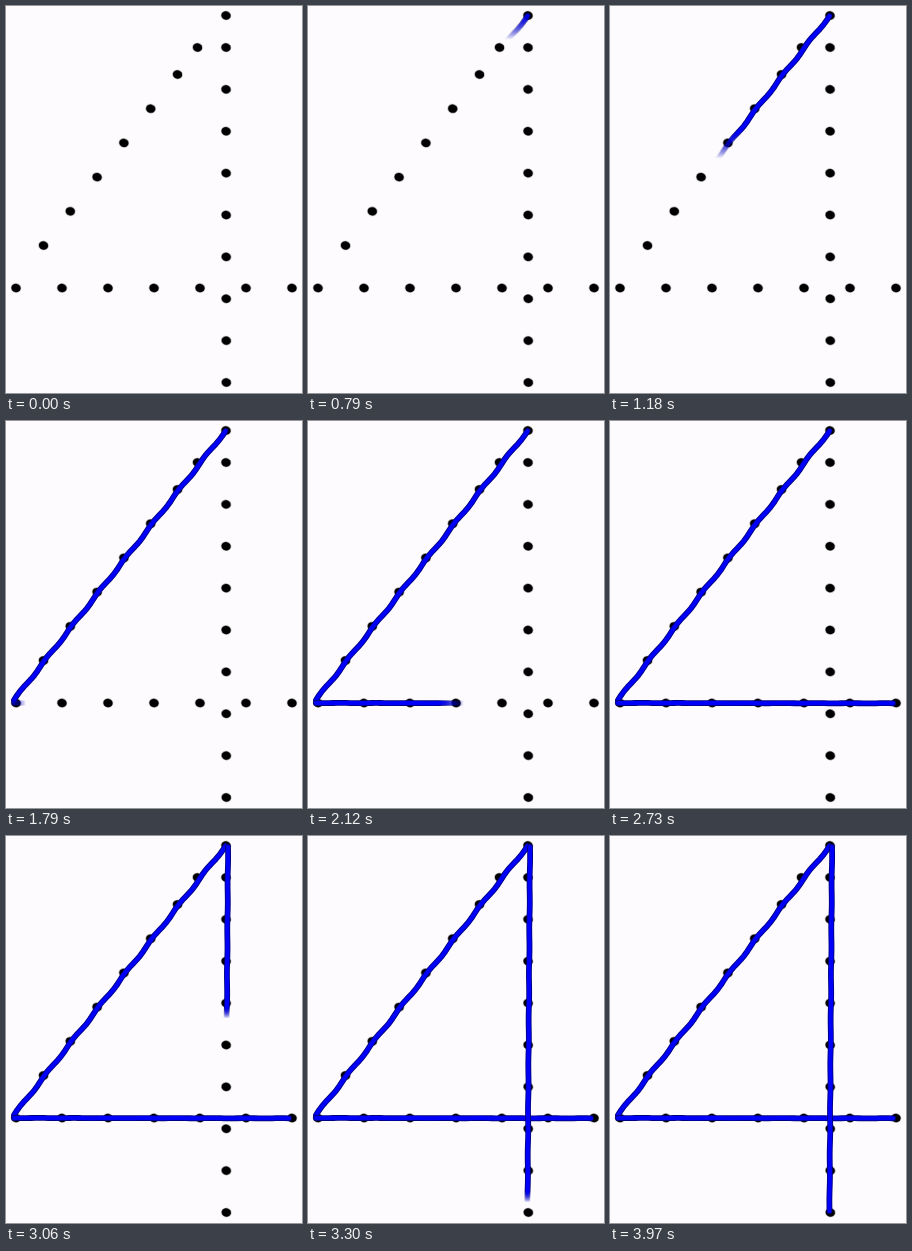
An HTML page with a canvas that plays this animation: 296 by 387 pixels, repeating every 4 s.

```html
<!DOCTYPE html>
<html lang="en">
<head>
<meta charset="utf-8">
<title>Drawing the digit 4</title>
<style>
  html, body { margin: 0; width: 100%; height: 100%; overflow: hidden; background: #fdfbfe; }
  canvas { display: block; }
</style>
</head>
<body>
<canvas id="stage" width="296" height="387"></canvas>
<script>
const LOOP = 4000;
const ctx = document.getElementById('stage').getContext('2d');

// Each stroke is revealed by a soft-edged wipe along one axis.
const strokes = [
  { start: 700, duration: 1000, axis: 'y', soft: 0.1, a: { x: 219.5, y: 10 }, b: { x: 8, y: 279 }, wobble: 0.5 },
  { start: 1752, duration: 750, axis: 'x', soft: 0.09, a: { x: 8, y: 282 }, b: { x: 283, y: 282.3 }, wobble: 0.1 },
  { start: 2832, duration: 500, axis: 'y', soft: 0.03, a: { x: 222, y: 11 }, b: { x: 219.5, y: 375 }, wobble: 0.2 }
];

const mix = (a, b, t) => a + (b - a) * t;

function drawDot(x, y) {
  ctx.beginPath();
  ctx.ellipse(x, y, 4.6, 4.1, 0.2, 0, Math.PI * 2);
  ctx.fill();
  ctx.stroke();
}

function drawDotRow(count, x1, y1, x2, y2) {
  for (let i = 0; i < count; i++) {
    const t = i / (count - 1);
    drawDot(mix(x1, x2, t), mix(y1, y2, t));
  }
}

function drawDots() {
  ctx.fillStyle = '#000';
  ctx.strokeStyle = 'rgba(0, 0, 0, 0.35)';
  ctx.lineWidth = 1.4;
  drawDot(220, 9.5);
  drawDot(191.5, 41.5);
  drawDotRow(6, 171.5, 68.5, 37.5, 239.5);
  drawDotRow(7, 10, 282, 286, 282);
  drawDotRow(9, 220, 41.5, 220.3, 376.5);
}

function wipePaint({ axis, soft, a, b }, progress, rgb) {
  const from = a[axis] - 4, to = b[axis] + 4;
  const lead = mix(from, to, progress * (1 + soft));
  const solid = lead - (to - from) * soft;
  const paint = axis === 'x'
    ? ctx.createLinearGradient(solid, 0, lead, 0)
    : ctx.createLinearGradient(0, solid, 0, lead);
  paint.addColorStop(0, `rgba(${rgb}, 1)`);
  paint.addColorStop(1, `rgba(${rgb}, 0)`);
  return paint;
}

function strokePath({ a, b, wobble }) {
  const path = new Path2D();
  for (let t = 0; t <= 1; t += 1 / 64) {
    const sway = wobble * Math.sin(t * Math.PI * 16);
    path.lineTo(mix(a.x, b.x, t) + sway, mix(a.y, b.y, t) + sway);
  }
  return path;
}

function drawStroke(stroke, time) {
  const progress = Math.min(1, (time - stroke.start) / stroke.duration);
  if (progress <= 0) return;
  const path = strokePath(stroke);
  // A dark rim under a bright core.
  for (const [rgb, width] of [['0, 0, 130', 5.8], ['0, 0, 248', 4]]) {
    ctx.strokeStyle = wipePaint(stroke, progress, rgb);
    ctx.lineWidth = width;
    ctx.stroke(path);
  }
}

function render(time) {
  ctx.clearRect(0, 0, 296, 387);
  drawDots();
  strokes.forEach(stroke => drawStroke(stroke, time));
}

ctx.lineCap = ctx.lineJoin = 'round';
const origin = performance.now();
function frame() {
  render((performance.now() - origin) % LOOP);
  requestAnimationFrame(frame);
}
frame();
</script>
</body>
</html>
```
